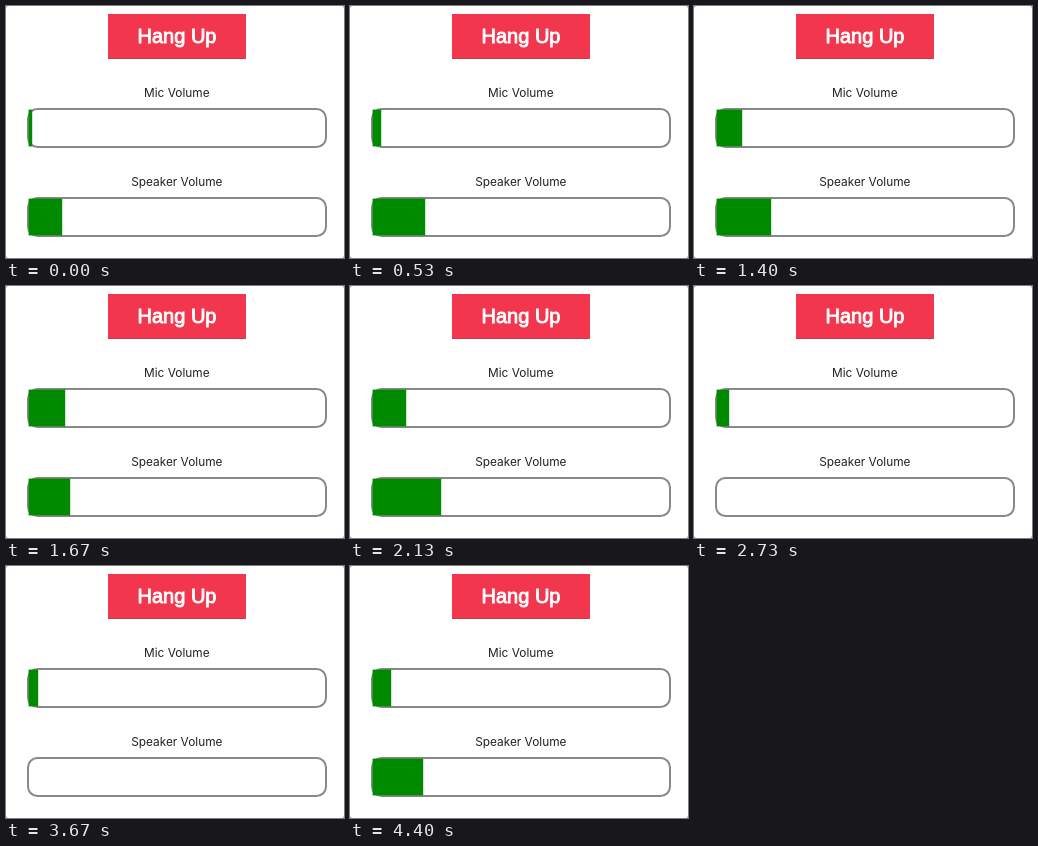
Recreate the animation shown at these times as an HTML page. Size 338 px wide and 252 px high, loop 4.47 s.

```html
<!DOCTYPE html>
<html lang="en">
<head>
<meta charset="utf-8">
<title>Call volume</title>
<style>
  html, body { margin: 0; width: 100%; height: 100%; overflow: hidden; background: #aaa; }
  svg { display: block; }
  text { text-anchor: middle; font: 11.85px Inter, sans-serif; fill: #222; }
  .hang { font: 20px "Liberation Sans", Arial, sans-serif; fill: #fff; stroke: #fff; stroke-width: .9px; }
  .box { fill: none; stroke: #888; stroke-width: 2px; }
  .level { fill: #008a00; }
</style>
</head>
<body>
<svg width="338" height="252" viewBox="0 0 338 252">
  <rect width="338" height="252" rx="3" fill="#fff"/>
  <rect x="102" y="8" width="138" height="45" fill="#f2364d"/>
  <rect x="102" y="52" width="138" height="1" fill="#c93a4b"/>
  <text class="hang" x="171" y="37">Hang Up</text>
  <text x="170.8" y="91">Mic Volume</text>
  <rect class="box" x="22" y="103" width="298" height="38" rx="9.5"/>
  <rect class="level" id="mic" x="22.6" y="103.6" height="36.8"/>
  <text x="170.8" y="180">Speaker Volume</text>
  <rect class="box" x="22" y="192" width="298" height="38" rx="9.5"/>
  <rect class="level" id="speaker" x="22.6" y="192.6" height="36.8"/>
</svg>
<script>
const LOOP = 4470, TICK = 1000 / 15; // the meters update 15 times a second

// each meter glides between a few [tick, width] points
const meters = {
  mic: [[0, 3], [16, 12], [25, 36], [32, 33], [41, 12], [55, 9], [66, 18]],
  speaker: [[0, 33], [16, 71], [25, 41], [32, 68], [39, 0], [58, 0], [66, 50]]
};

function widthAt(points, tick) {
  const i = points.findIndex(p => p[0] > tick);
  if (i < 0) return points.at(-1)[1];
  const [t0, w0] = points[i - 1], [t1, w1] = points[i];
  return w0 + (w1 - w0) * (tick - t0) / (t1 - t0);
}

let start;
function draw(now) {
  start ??= now;
  const tick = Math.floor(((now - start) % LOOP + 4) / TICK);
  for (const id in meters) {
    const width = Math.round(widthAt(meters[id], tick));
    document.getElementById(id).setAttribute("width", width && width + .6);
  }
  requestAnimationFrame(draw);
}
requestAnimationFrame(draw);
</script>
</body>
</html>
```
